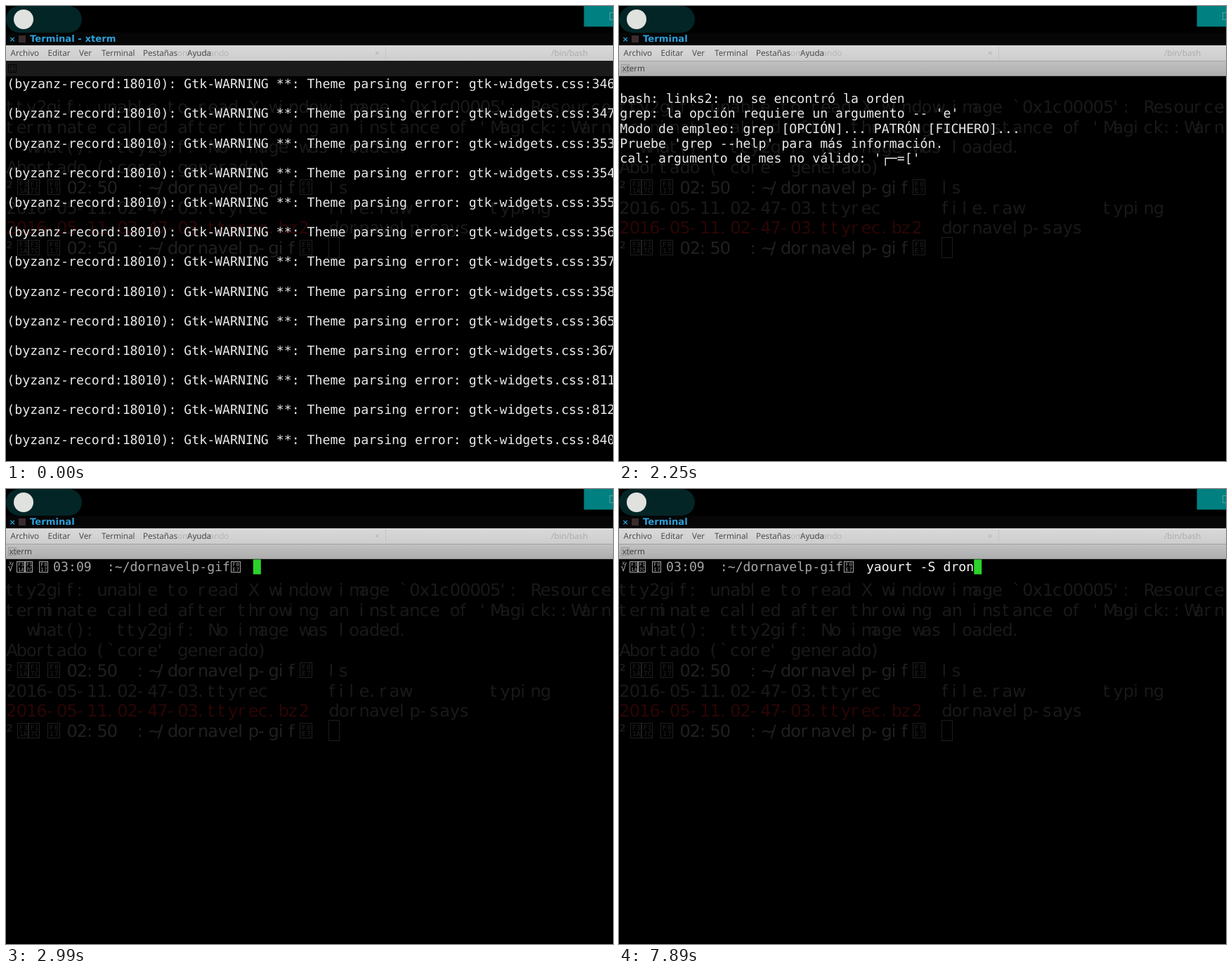
Recreate the animation shown at these times as an HTML page with a canvas. Size 864 px wide and 648 px high, loop 8000 ms.

```html
<!DOCTYPE html>
<html lang="es">
<head>
<meta charset="utf-8">
<title>Terminal</title>
<style>
  html, body { margin: 0; width: 100%; height: 100%; overflow: hidden; background: #000; }
  canvas { display: block; width: 864px; height: 648px; }
</style>
</head>
<body>
<canvas id="stage" width="864" height="648"></canvas>
<script>
const ctx = document.getElementById('stage').getContext('2d');
ctx.textRendering = 'geometricPrecision';
const LOOP = 8000;
const MONO = '18.2px "DejaVu Sans Mono", monospace';
const WIDE = '24px "DejaVu Sans", sans-serif';
const UI = '11.7px "Open Sans", sans-serif';
const TITLE = 'bold 13.2px "DejaVu Sans", sans-serif';
const LEFT = 1.3, CELL = 10.956, ROW = 21.1, TOP = 117.2;
const WIDE_CELL = 14.35, WIDE_ROW = 28.7;
const BLUE = '#27749e', WHITE = '#e8e8e8';

const warning = '(byzanz-record:18010): Gtk-WARNING **: Theme parsing error: gtk-widgets.css:';
const lateLines = [346, 347, 353, 354, 355, 356, 357, 358, 365, 367, 811, 812, 840];
const earlyLines = [336, 337, 347, 348, 348, 349, 351, 351, 351, 352, 357, 357, 359, 359];

const errors = [
  'bash: links2: no se encontró la orden',
  "grep: la opción requiere un argumento -- 'e'",
  'Modo de empleo: grep [OPCIÓN]... PATRÓN [FICHERO]...',
  "Pruebe 'grep --help' para más información.",
  "cal: argumento de mes no válido: '┌─=['"
];
const specs = [
  ['OS:', 'Arch Linux x86_64'],
  ['Hostname:', 'dornavelpnet'],
  ['Uptime:', '13:24, 19 sec'],
  ['Kernel:', '4.5.1-1-ARCH'],
  ['Shell:', '/bin/bash'],
  ['Packages:', '1562'],
  ['WM:', 'Openbox'],
  ['GTK2 theme:', 'elementary'],
  ['GTK2 icon theme:', 'elementary'],
  ['GTK2 font name:', 'Cantarell 11'],
  ['RAM:', '2129M / 3865M (55%)'],
  ['SWAP:', '21M / 990M (2%)'],
  ['CPU:', 'Intel(R) Core(TM) i5-4258U CPU @ 2.40GHz'],
  ['Boot:', '39M / 274M (15%) (ext2)'],
  ['Home:', '30G / 32G (97%) (ext4)'],
  ['Root:', '22G / 78G (30%) (ext4)']
];

const command = 'yaourt -S dron';
const keyTimes = [5260, 5340, 5520, 5690, 5690, 5690, 5690, 6460, 6700, 6860, 7370, 7520, 7730, 7890];

function rect(x, y, w, h, color) {
  ctx.fillStyle = color;
  ctx.fillRect(x, y, w, h);
}

function text(str, x, y, font, color) {
  ctx.font = font;
  ctx.fillStyle = color;
  ctx.fillText(str, x, y);
}

// One glyph per fixed-width cell.
function cells(str, x, y, step, font, color) {
  ctx.font = font;
  ctx.fillStyle = color;
  [...str].forEach((ch, i) => { if (ch !== ' ') ctx.fillText(ch, x + i * step, y); });
}

function mono(str, col, row, color = WHITE, bold = false) {
  cells(str, LEFT + col * CELL, TOP + row * ROW, CELL, (bold ? 'bold ' : '') + MONO, color);
}

function wide(str, col, row, color = '#191919') {
  cells(str, col * WIDE_CELL + 0.3, 152 + row * WIDE_ROW, WIDE_CELL, WIDE, color);
}

// Missing-glyph box holding four hex digits.
function hexBox(code, x, y, w, h, color) {
  ctx.strokeStyle = color;
  ctx.lineWidth = 1;
  ctx.strokeRect(x + 0.5, y + 0.5, w - 1, h - 1);
  const font = `${h * 0.44}px "DejaVu Sans Mono", monospace`;
  [...code].forEach((ch, i) =>
    text(ch, x + w * (0.17 + 0.38 * (i % 2)), y + h * (i < 2 ? 0.46 : 0.88), font, color));
}

function vertical(y, h, from, to) {
  const g = ctx.createLinearGradient(0, y, 0, y + h);
  g.addColorStop(0, from);
  g.addColorStop(1, to);
  rect(0, y, 864, h, g);
}

function ghost() {
  const bright = '#202020';
  wide("tty2gif: unable to read X window image `0x1c00005': Resource", 0, 0);
  wide("terminate called after throwing an instance of 'Magick::Warn", 0, 1);
  wide('  what():  tty2gif: No image was loaded.', 0, 2);
  wide("Abortado (`core' generado)", 0, 3);
  for (const row of [4, 7]) {
    const y = 247 + (row - 4) * WIDE_ROW;
    wide('²     02:50  :~/dornavelp-gif', 0, row, bright);
    hexBox('F31A', 16, y, 16, 22, bright);
    hexBox('F17C', 32, y, 16, 22, bright);
    hexBox('F017', 59, y, 18, 22, bright);
    hexBox('F0E7', 418, y, 18, 22, bright);
  }
  wide('ls', 32, 4);
  wide('2016-05-11.02-47-03.ttyrec', 0, 5);
  wide('file.raw', 32, 5);
  wide('typing', 48, 5);
  wide('2016-05-11.02-47-03.ttyrec.bz2', 0, 6, '#2b0505');
  wide('dornavelp-says', 32, 6);
  ctx.strokeStyle = '#1c1c1c';
  ctx.strokeRect(459.5, 329.5, 15, 29);
}

function chrome(tabbed) {
  ctx.fillStyle = '#032526';
  ctx.beginPath();
  ctx.roundRect(0, 0, 108, 38, 19);
  ctx.fill();
  ctx.fillStyle = '#dfe2df';
  ctx.beginPath();
  ctx.arc(25, 19, 14, 0, Math.PI * 2);
  ctx.fill();

  rect(822.6, 0, 42, 29.4, '#008080');
  ctx.strokeStyle = '#52a5a5';
  ctx.lineWidth = 1;
  ctx.strokeRect(859.5, 9.5, 10, 10);

  rect(0, 38, 864, 18, '#060606');
  text('×', 4.5, 51, 'bold 11px "DejaVu Sans", sans-serif', '#2e9fd8');
  rect(18, 42, 10, 10, '#3a2c2e');
  text(tabbed ? 'Terminal' : 'Terminal - xterm', 34, 51, TITLE, '#2e9fd8');

  vertical(56, 22, '#d9d9d9', '#cdcdcd');
  const faint = '#b4b4b4';
  text('om', 244, 71, UI, faint);
  text('comando', 266, 71, UI, faint);
  text('×', 525, 71, UI, '#b0b0b0');
  text('/bin/bash', 776, 71, UI, '#aaaaaa');
  rect(540, 58, 1, 18, '#c5c5c5');
  const menu = { Archivo: 6.5, Editar: 59.5, Ver: 104, Terminal: 136, 'Pestañas': 195, Ayuda: 258 };
  for (const [label, x] of Object.entries(menu)) text(label, x, 71, UI, '#454545');

  if (tabbed) {
    vertical(78, 22, '#c2c2c2', '#acacac');
    rect(0, 78, 864, 1, '#a2a2a2');
    rect(0, 99, 864, 1, '#8c8c8c');
    hexBox('F31A', 3, 83, 12, 12, '#999999');
    text('xterm', 4.5, 93, UI, '#3c3c3c');
  } else {
    rect(0, 78, 864, 22, '#1a1a1a');
    hexBox('F31A', 3, 83, 12, 12, '#050505');
  }
}

function warnings(numbers, firstRow) {
  numbers.forEach((n, i) => mono(warning + n, 0, firstRow + i * 2));
}

function systemInfo() {
  rect(22, 250, 375, 375, BLUE);
  specs.forEach(([label, value], i) => {
    mono(label, 40, 7 + i, BLUE, true);
    mono(value, 41 + label.length, 7 + i);
  });
}

function prompt(t) {
  const gray = '#a6a6a6';
  text('√', 2, 117, '15px "DejaVu Sans Mono", monospace', gray);
  text('x', 4, 108, '8px "DejaVu Sans Mono", monospace', gray);
  hexBox('F31A', 15, 103, 12, 16, gray);
  hexBox('F17C', 27, 103, 11, 16, gray);
  hexBox('F017', 47, 103, 13, 16, gray);
  mono('03:09  :~/dornavelp-gif', 6, 0, gray);
  hexBox('F0E7', 320, 103, 14, 16, gray);
  const typed = keyTimes.filter(k => t >= k).length;
  mono(command.slice(0, typed), 32, 0, '#f2f2f2');
  rect(LEFT + (32 + typed) * CELL, 100.4, CELL, ROW, '#2bd42b');
}

function draw(t) {
  rect(0, 0, 864, 648, '#000');
  ghost();
  chrome(t >= 2170);
  if (t < 50) warnings(lateLines, 0);
  else if (t < 2170) warnings(earlyLines, -1);
  else if (t < 2990) {
    const shown = t < 2210 ? 0 : t < 2250 ? 1 : errors.length;
    errors.slice(0, shown).forEach((line, i) => mono(line, 0, i + 1));
    if (t >= 2290) systemInfo();
  } else prompt(t);
}

const start = performance.now();
function tick() {
  draw((performance.now() - start) % LOOP);
  requestAnimationFrame(tick);
}
tick();
</script>
</body>
</html>
```
